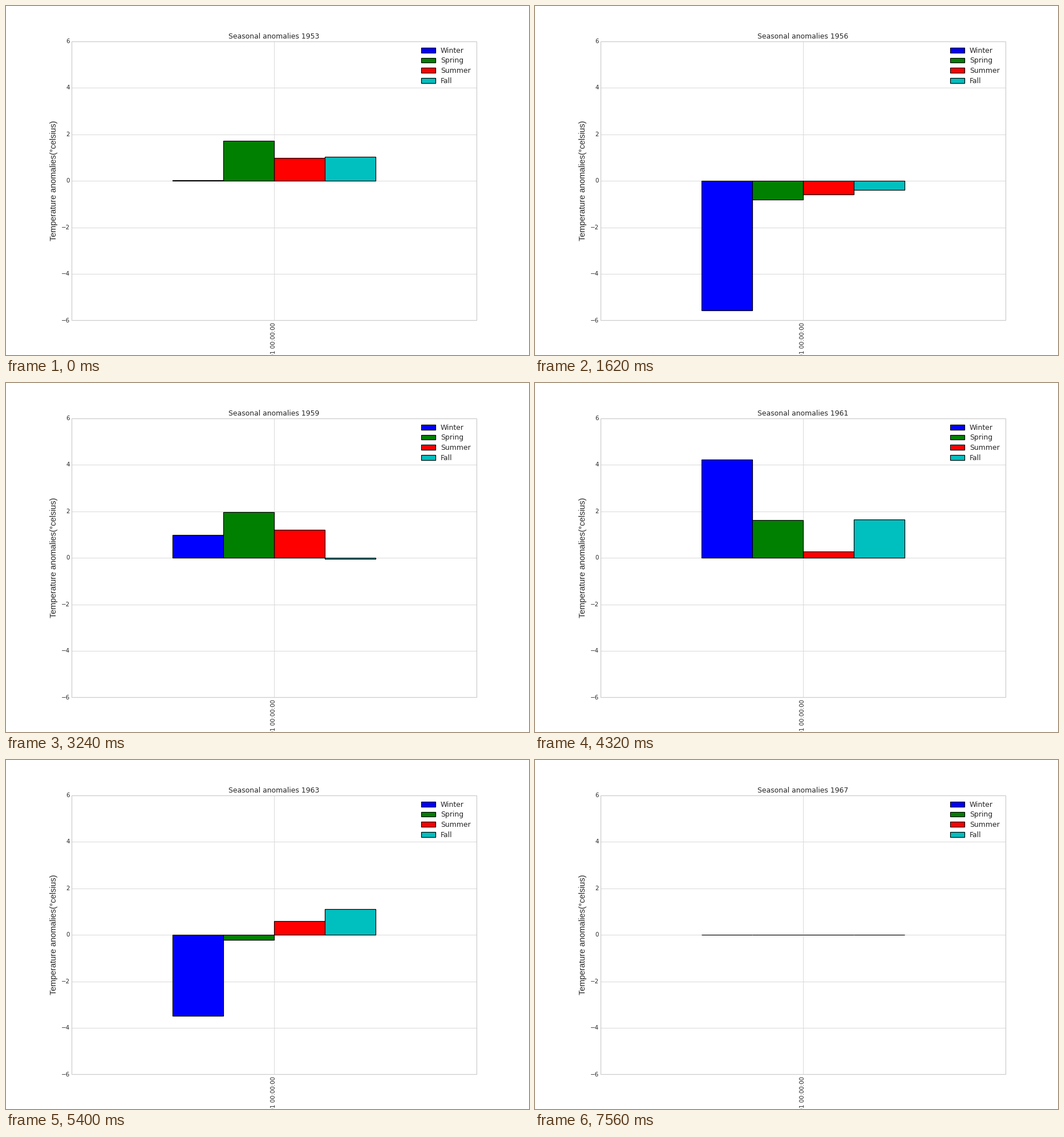
A matplotlib script that plays this animation: 917 by 611 pixels, repeating every 8000 ms.

```python
import matplotlib.pyplot as plt
from matplotlib.animation import FuncAnimation
from matplotlib.patches import Rectangle

W, H, DPI = 917, 611, 100
LOOP, STEP, HOLD = 8000, 40, 540
LEFT, RIGHT, MID = 114.6, 825.3, 470
ZERO, UNIT = 306.05, 40.74
BAR = (RIGHT - LEFT) / 8
INK = "0.15"
SANS = "DejaVu Sans"

SEASONS = [("Winter", "b"), ("Spring", "g"), ("Summer", "r"), ("Fall", "c")]
FIRST_YEAR = 1953
# winter, spring, summer, fall; years after the last row have no data
ANOMALIES = [
    (0.03, 1.73, 0.98, 1.04),
    (-0.93, 0.50, -0.30, 0.60),
    (1.07, -2.90, 0.69, 0.90),
    (-5.57, -0.80, -0.60, -0.40),
    (2.87, -1.79, -0.22, 0.23),
    (1.60, -2.09, 0.30, 0.60),
    (0.98, 1.96, 1.20, -0.05),
    (-2.40, 0.90, 0.40, 0.60),
    (4.23, 1.63, 0.26, 1.64),
    (0.90, -2.18, -0.60, 0.30),
    (-3.48, -0.23, 0.60, 1.10),
    (0.90, 0, 0, 0),
]
NO_DATA = (0, 0, 0, 0)

fig = plt.figure(figsize=(W / DPI, H / DPI), dpi=DPI, facecolor="white")
ax = fig.add_axes([0, 0, 1, 1])
ax.set_xlim(0, W)
ax.set_ylim(H, 0)
ax.axis("off")


def pt(px):
    return px * 72 / DPI


def y_of(value):
    return ZERO - UNIT * value


def label(x, y, text, px, font=SANS, **kw):
    return ax.text(x, y, text, fontsize=pt(px), family=font, color=INK, **kw)


def box(x, y, w, h, color, edge="black", z=3):
    return ax.add_patch(Rectangle((x, y), w, h, facecolor=color, edgecolor=edge,
                                  linewidth=pt(1.2), zorder=z))


def line(xs, ys):
    ax.plot(xs, ys, color="0.85", linewidth=pt(1), zorder=1)


# grid, frame and tick labels
for v in range(-6, 7, 2):
    y = y_of(v)
    if abs(v) < 6:
        line([LEFT, RIGHT], [y, y])
    label(111.6, y + 3.4, str(v).replace("-", "\u2212"), 10.3, ha="right")
line([MID, MID], [y_of(6), y_of(-6)])
box(LEFT, y_of(6), RIGHT - LEFT, 12 * UNIT, "none", "0.8", 2)

label(MID - 1, 554, "01-01 00:00:00", 10.3, rotation=90, ha="center", va="top")
label(88.4, 306, "Temperature anomalies(\u00b0celsius)", 14.42, "Liberation Sans",
      rotation=90, rotation_mode="anchor", ha="center", va="baseline")
title = label(MID, 57, "", 12.36, ha="center")

# legend
for i, (name, color) in enumerate(SEASONS):
    base = 81.6 + 17.75 * i
    box(728.2, base - 8.65, 24.7, 8.65, color)
    label(762, base, name, 12.36)

bars = [box(MID + (i - 2) * BAR, ZERO, BAR, 0, color)
        for i, (_, color) in enumerate(SEASONS)]


def draw(frame):
    n = (frame * STEP + STEP // 2) // HOLD
    values = ANOMALIES[n] if n < len(ANOMALIES) else NO_DATA
    title.set_text(f"Seasonal anomalies {FIRST_YEAR + n}")
    for bar, v in zip(bars, values):
        bar.set_height(-UNIT * v)
    return [title, *bars]


anim = FuncAnimation(fig, draw, frames=LOOP // STEP, interval=STEP,
                     repeat=True, repeat_delay=0, blit=False)
plt.show()
```
